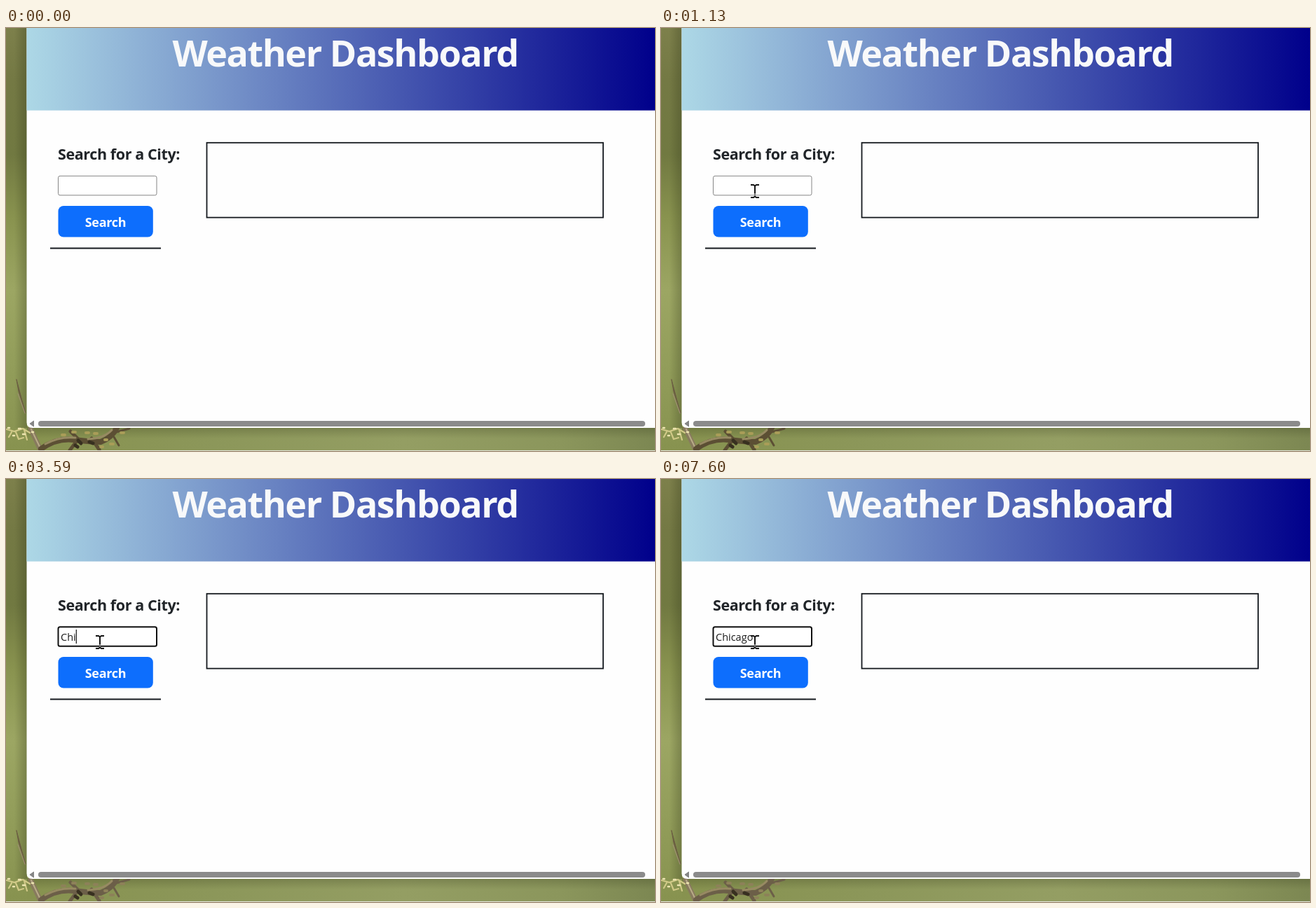
Recreate the animation shown at these times as an HTML page. Size 926 px wide and 604 px high, loop 8 s.

```html
<!DOCTYPE html>
<html lang="en">
<head>
<meta charset="utf-8">
<title>Weather Dashboard</title>
<style>
  html, body { margin: 0; width: 100%; height: 100%; overflow: hidden; background: #8a9653; }
  svg { display: block; width: 926px; height: 604px; }
  text { font-family: "Open Sans", "Noto Sans", sans-serif; }
  .title { font-size: 52px; font-weight: 700; letter-spacing: -1.45px; fill: #f8f9fa; }
  .label { font-size: 21.5px; font-weight: 700; letter-spacing: -.4px; fill: #212529; }
  .action { font-size: 18px; font-weight: 700; letter-spacing: -.3px; fill: #fff; }
  .typed { font-size: 14.5px; fill: #1c1c1c; }
  .line { fill: none; stroke: #15191e; stroke-width: 1.8; }
  .pointer { fill: #fff; stroke: #1c1c1c; stroke-width: .9; stroke-linejoin: round; }
</style>
</head>
<body>
<svg viewBox="0 0 926 604">
  <defs>
    <linearGradient id="leaf" x2="0" y2="1">
      <stop offset="0" stop-color="#7d804b"/>
      <stop offset=".12" stop-color="#747944"/>
      <stop offset=".3" stop-color="#717941"/>
      <stop offset=".45" stop-color="#89934f"/>
      <stop offset=".62" stop-color="#9ca663"/>
      <stop offset=".8" stop-color="#929d5a"/>
      <stop offset="1" stop-color="#87924f"/>
    </linearGradient>
    <linearGradient id="ground">
      <stop offset="0" stop-color="#87924f"/>
      <stop offset=".3" stop-color="#8c975a"/>
      <stop offset=".6" stop-color="#949e63"/>
      <stop offset=".85" stop-color="#8b965c"/>
      <stop offset="1" stop-color="#7c8752"/>
    </linearGradient>
    <linearGradient id="edge">
      <stop offset="0" stop-color="#2b3014" stop-opacity="0"/>
      <stop offset="1" stop-color="#2b3014" stop-opacity=".3"/>
    </linearGradient>
    <linearGradient id="under" x2="0" y2="1">
      <stop offset="0" stop-color="#2b3014" stop-opacity=".25"/>
      <stop offset="1" stop-color="#2b3014" stop-opacity="0"/>
    </linearGradient>
    <linearGradient id="sky">
      <stop offset="0" stop-color="lightblue"/>
      <stop offset="1" stop-color="darkblue"/>
    </linearGradient>
  </defs>

  <!-- blurred garden behind the window -->
  <rect width="60" height="604" fill="url(#leaf)"/>
  <rect x="30" y="560" width="896" height="44" fill="url(#ground)"/>
  <rect x="12" width="18" height="571" fill="url(#edge)"/>
  <rect x="30" y="570" width="896" height="16" fill="url(#under)"/>

  <g id="twigs" fill="none" stroke-linecap="round">
    <path d="M15 502L18 519L28 550L23 532Z" fill="#6b5d42" stroke="#6b5d42"/>
    <path d="M17 522L27 550" stroke="#9d8f70" stroke-width="1.2"/>
    <path d="M35 572L50 604" stroke="#887a5e" stroke-width="7"/>
    <path d="M36 573L51 604" stroke="#b8ab88" stroke-width="2"/>
    <g class="bark" stroke="#5c4f34">
      <path d="M50 601Q72 585 97 588T135 591Q151 585 158 571" stroke-width="8"/>
      <path d="M92 576L103 587L91 603M122 586L133 602" stroke-width="5"/>
      <path d="M146 580L176 572M154 584L161 596" stroke-width="3"/>
    </g>
    <path d="M56 594Q76 583 99 585M117 587Q140 586 151 574" stroke="#978a62" stroke-width="3"/>
    <path d="M103 589l4 4M119 591l5 2M99 596l3 2" stroke="#383020" stroke-width="5"/>
    <path d="M1 573L12 576L24 572L34 578M8 577L4 584M14 577L18 587L25 585M26 574L30 588" stroke="#d0c987" stroke-width="2.200"/>
    <path d="M3 571h2M18 572h3M10 582h2M24 580h3M37 577h2" stroke="#ece4b0" stroke-width="2.500"/>
    <path class="bloom" d="M80 581h4M95 577h4M114 578h4M126 579h4M141 588h3M149 594h4M135 598h3M164 578h4" stroke="#a99d58" stroke-width="4"/>
  </g>
  <rect y="603" width="926" height="1" fill="#e4e5da"/>

  <!-- window -->
  <path d="M29.500 0H926V571H37.500Q29.500 571 29.500 563Z" fill="#fefefe"/>
  <rect x="29.500" width="896.500" height="117.700" fill="url(#sky)"/>
  <text class="title" x="237.500" y="55">Weather Dashboard</text>

  <text class="label" x="74" y="188">Search for a City:</text>
  <rect class="line" x="286.500" y="163.800" width="565.500" height="106.800"/>
  <rect id="field" x="74.500" y="211.300" width="140.500" height="27.500" rx="2.500" fill="#fff"/>
  <text id="typed" class="typed" x="78" y="231"></text>
  <rect id="caret" y="215" width="1.200" height="20" fill="#111"/>
  <rect id="button" x="74.500" y="254" width="135.300" height="44.500" rx="7.500"/>
  <text class="action" x="142" y="283.500" text-anchor="middle">Search</text>
  <path class="line" d="M63 314.500H221"/>

  <rect x="46" y="561" width="866" height="8" rx="4" fill="#8b8b8b"/>
  <path d="M34 565L39.500 561V569Z" fill="#858585" stroke="#858585" stroke-linejoin="round"/>

  <g id="cursor">
    <path id="arrow" class="pointer" d="M0 0V20.500L4.700 16.200L8 23L11.800 21.400L8.800 14.900H15Z"/>
    <g id="hand" class="pointer">
      <path d="M-2 13V1.800Q-2 0 0 0T2 1.800V8Q3.500 6.600 5.400 8.400Q7.500 7.200 9 9.400Q12 8.800 12.700 11.500V18Q12.700 22 10 27H-.5Q-2 23 -6.500 17.500Q-8 15 -6.300 13.800Q-4.500 13 -2 16Z"/>
      <path d="M2 8V14M5.500 8.500V14M9 9.500V14" fill="none"/>
    </g>
    <g id="beam" fill="none" stroke="#141414" stroke-width="2">
      <path d="M-6 -9H-2L0 -7.500L2 -9H6M-6 9H-2L0 7.500L2 9H6M0 -8V8"/>
      <path d="M0 3V7" stroke="#777"/>
    </g>
  </g>
</svg>

<script>
  const LOOP = 8000, FOCUS = 1430, STEP = 200 / 3;
  const CITY = "Chicago";
  const KEYS = [3000, 3330, 3590, 4060, 4200, 4520, 4990];
  const CARETS = [78.3, 86.8, 95.6, 99.7, 106.4, 114.2, 122.8, 131.3];
  const BLINKS = [[1990, 2520], [5520, 6060], [6520, 7120], [7600, LOOP]];

  const el = id => document.getElementById(id);
  const [field, typed, caret, button, cursor, twigs] =
    ["field", "typed", "caret", "button", "cursor", "twigs"].map(el);
  const shapes = ["arrow", "hand", "beam"];
  const show = (node, on) => node.setAttribute("visibility", on ? "visible" : "hidden");
  const mix = (a, b, k) => a + (b - a) * k;
  const ramp = (t, from, to) => Math.min(1, Math.max(0, (t - from) / (to - from)));

  function pointerAt(t) {
    if (t < 200) return null;
    if (t >= 1130) return ["beam", 134, 233];
    if (t >= 1060) return ["beam", 135, 222];
    const n = Math.floor((t - 193) / STEP);
    if (n < 8) {
      const rest = (1 - n / 8) ** 1.4;
      return ["arrow", 174 + 672 * rest, 280 + 308 * rest];
    }
    const k = Math.min(1, (n - 8) / 3);
    return [n < 11 ? "hand" : "arrow", mix(174, 138.5, k), mix(280, 240, k)];
  }

  function draw(t) {
    const pointer = pointerAt(t);
    for (const name of shapes) show(el(name), pointer && pointer[0] === name);
    if (pointer) cursor.setAttribute("transform", `translate(${pointer[1]} ${pointer[2]})`);

    const hover = ramp(t, 730, 870) - ramp(t, 870, 990);
    button.setAttribute("fill",
      `rgb(${mix(13, 11, hover)}, ${mix(110, 94, hover)}, ${mix(253, 215, hover)})`);

    const focused = t >= FOCUS;
    field.setAttribute("stroke", focused ? "#101010" : "#858585");
    field.setAttribute("stroke-width", focused ? 2 : 1);

    const count = KEYS.filter(at => t >= at).length;
    typed.textContent = CITY.slice(0, count);
    caret.setAttribute("x", CARETS[count]);
    show(caret, focused && !BLINKS.some(([off, on]) => t >= off && t < on));

    twigs.querySelector(".bark").setAttribute("stroke", focused ? "#6c5f48" : "#5c4f34");
    twigs.querySelector(".bloom").setAttribute("stroke", focused ? "#8d8159" : "#a99d58");
  }

  const start = performance.now();
  function frame() {
    draw((performance.now() - start) % LOOP);
    requestAnimationFrame(frame);
  }
  frame();
</script>
</body>
</html>
```
